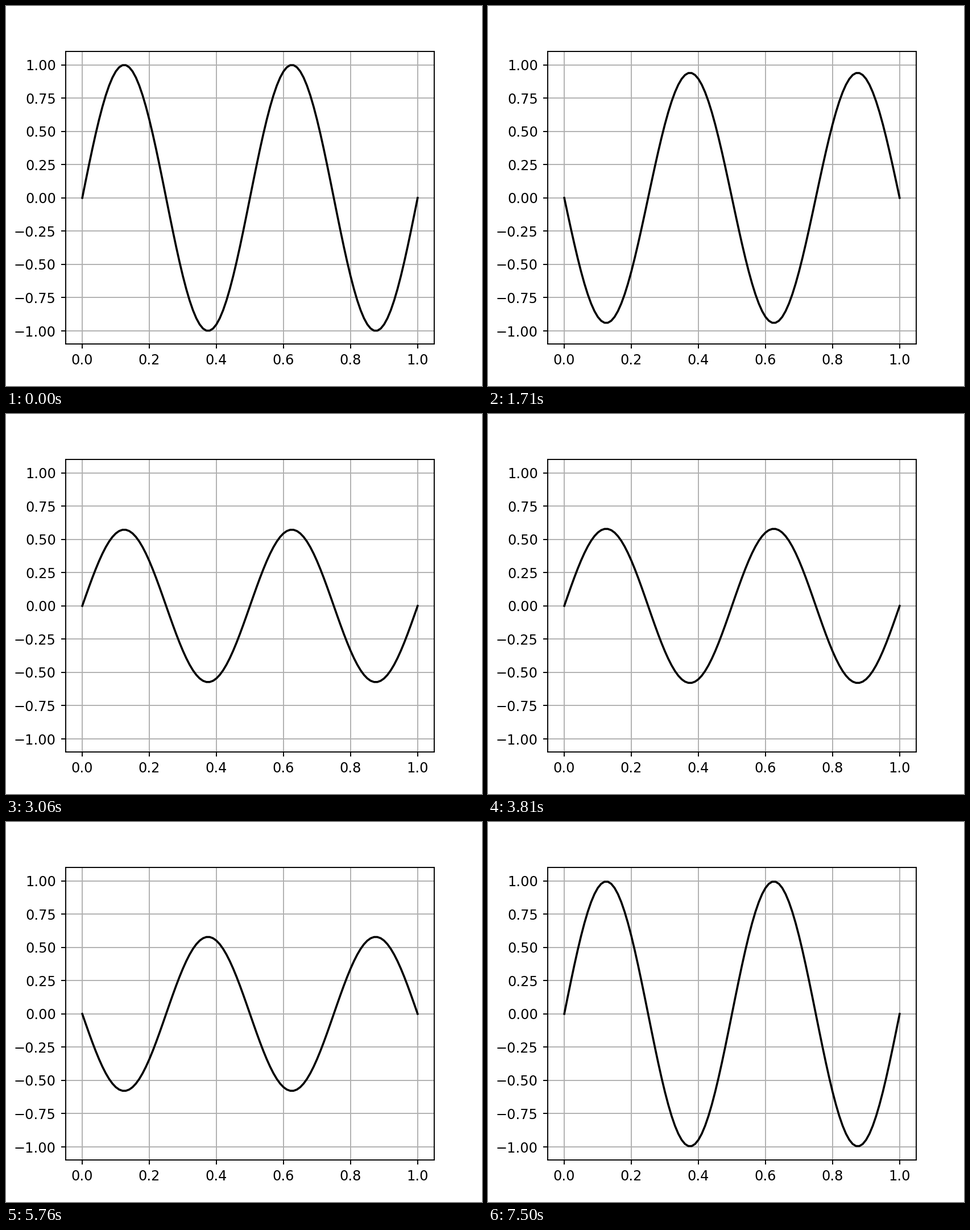
These frames come from a looping animation (837 px wide and 669 px high, 7.53 s). A matplotlib script:

```python
import numpy as np
import matplotlib.pyplot as plt
from matplotlib.animation import FuncAnimation

WIDTH, HEIGHT, DPI = 837, 669, 173
FRAMES, INTERVAL = 251, 30

# Standing wave on a string, as an explicit finite-difference scheme moves it
DX = 0.01
COURANT = 0.2
STEPS_PER_FRAME = 20
WAVENUMBER = 4 * np.pi
THETA = 2 * np.arcsin(COURANT * np.sin(WAVENUMBER * DX / 2))  # phase per step

x = np.linspace(0, 1, 101)
shape = np.sin(WAVENUMBER * x)


def amplitude(step):
    # The string starts at rest: steps 0 and 1 are equal
    return np.cos(THETA * (step - 0.5)) / np.cos(THETA / 2)


plt.rcParams.update({"font.family": "DejaVu Sans", "font.size": 10})
# The small margin keeps the pixel size from rounding down
fig = plt.figure(figsize=((WIDTH + 0.01) / DPI, (HEIGHT + 0.01) / DPI), dpi=DPI)
ax = fig.add_axes([0.125, 0.11, 0.775, 0.77])
ax.set_xlim(-0.05, 1.05)
ax.set_ylim(-1.1, 1.1)
ax.set_xticks(np.linspace(0, 1, 6))
ax.set_yticks(np.linspace(-1, 1, 9))
ax.grid(True)
line, = ax.plot(x, shape, color="black", lw=1.5)


def update(frame):
    line.set_ydata(amplitude(STEPS_PER_FRAME * frame) * shape)
    return line,


anim = FuncAnimation(fig, update, frames=FRAMES, interval=INTERVAL,
                     repeat=True, repeat_delay=0, blit=False)
plt.show()
```
